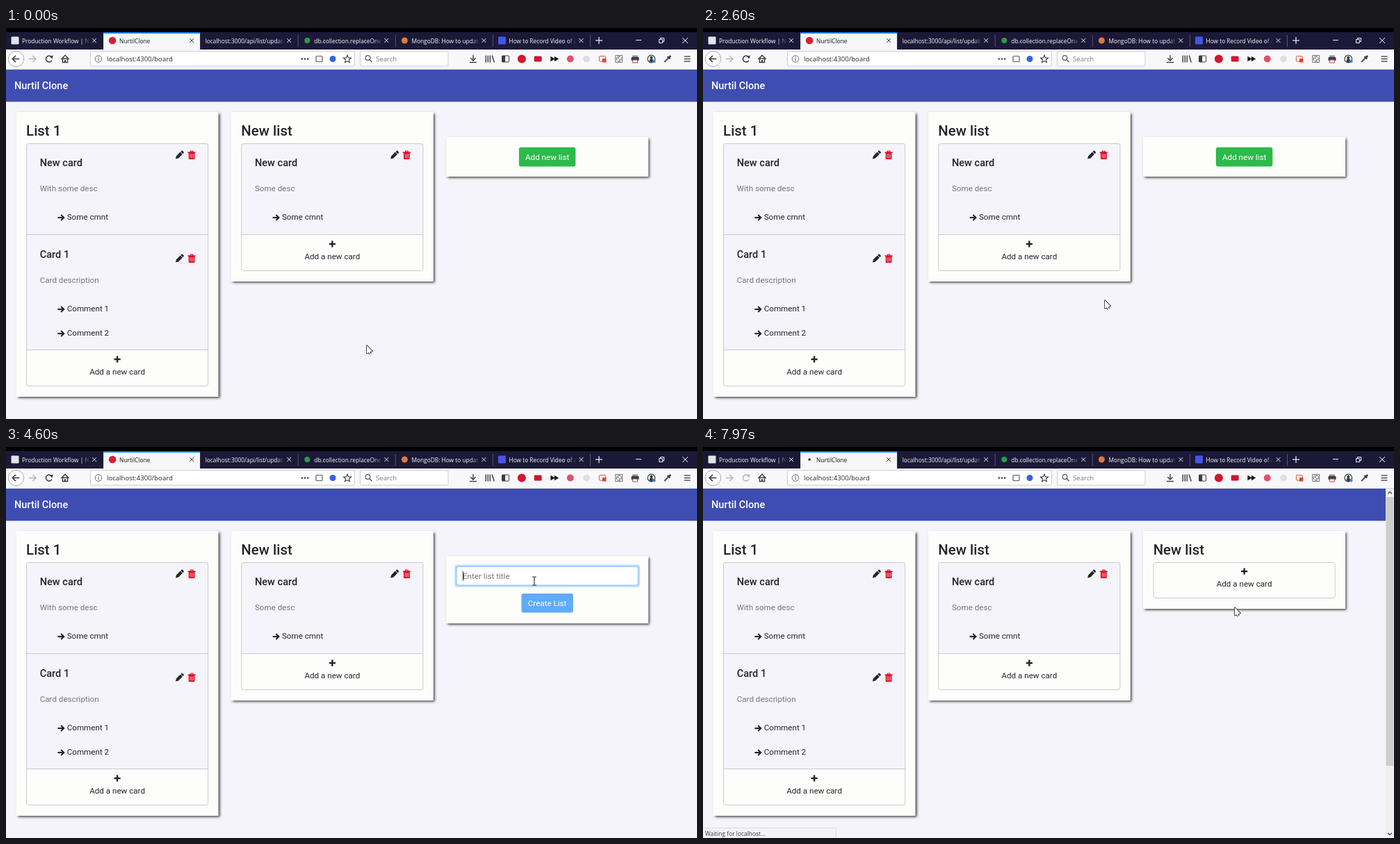
An HTML page with a canvas for the animation above (8 s loop, 994 by 563 pixels).

```html
<!DOCTYPE html>
<html lang="en">
<head>
<meta charset="utf-8">
<title>Board</title>
<style>
html, body { margin: 0; width: 100%; height: 100%; overflow: hidden; background: #000; }
canvas { display: block; width: 994px; height: 563px; }
</style>
</head>
<body>
<canvas id="stage" width="994" height="563"></canvas>
<script>
const ctx = document.getElementById('stage').getContext('2d');
const LOOP = 8000;
const K = 994 / 1366;            // page zoom
const BODY = 16 * K, CARD = 20 * K, HEAD = 28 * K;
const GAP = 20 * K, LIST_W = 400 * K, STEP = 425 * K, INNER = LIST_W - 2 * GAP;
const UI = '"Open Sans", "Noto Sans", sans-serif';
const PAGE = 'Roboto, Arial, sans-serif';
const INK = '#212529', MUTED = '#72777c', CHROME = '#3b3b40', PALE = '#b4b4ba';
const PAPER = '#fdfdfb', BG = '#f5f4fa', RULE = '#cbcad1', RED = '#e00a24';
const RIGHT = 0, DOWN = Math.PI / 2, LEFT = Math.PI, UP = -Math.PI / 2;

const OPEN = 4080, DONE = 7700;
const TITLE = 'New list';
const keyTime = i => 4980 + 157 * i;

const START = { x: 519, y: 457 };
const MOVES = [
  { from: 600, to: 1200, x: 510, y: 467 },
  { from: 2350, to: 3130, x: 789, y: 160 },
  { from: 3130, to: 3600, x: 760, y: 193 },
  { from: 7090, to: 7440, x: 765, y: 231 }
];

const clamp = v => Math.max(0, Math.min(1, v));
const smooth = v => v * v * (3 - 2 * v);

function paint(fill, line, width = 1) {
  if (fill) { ctx.fillStyle = fill; ctx.fill(); }
  if (line) { ctx.strokeStyle = line; ctx.lineWidth = width; ctx.stroke(); }
}

function box(x, y, w, h, fill, r = 0, line, width) {
  ctx.beginPath();
  ctx.roundRect(x, y, w, h, r);
  paint(fill, line, width);
}

function disc(x, y, r, fill, line, width) {
  ctx.beginPath();
  ctx.arc(x, y, r, 0, 7);
  paint(fill, line, width);
}

function line(x1, y1, x2, y2, color, width = 1.4) {
  ctx.beginPath();
  ctx.moveTo(x1, y1);
  ctx.lineTo(x2, y2);
  paint(null, color, width);
}

// Open arrowhead with its tip at x, y
function chevron(x, y, dir, r, color, width = 1.5) {
  const arm = s => [x + r * Math.cos(dir + s), y + r * Math.sin(dir + s)];
  ctx.beginPath();
  ctx.moveTo(...arm(2.36));
  ctx.lineTo(x, y);
  ctx.lineTo(...arm(-2.36));
  paint(null, color, width);
}

function arrow(x, y, dir, r, color, width) {
  const dx = r * Math.cos(dir), dy = r * Math.sin(dir);
  line(x - dx, y - dy, x + dx, y + dy, color, width);
  chevron(x + dx, y + dy, dir, r * 1.3, color, width);
}

function triangle(x, y, dir, r, color) {
  ctx.beginPath();
  for (let i = 0; i < 3; i++) {
    const a = dir + i * Math.PI * 2 / 3;
    ctx.lineTo(x + r * Math.cos(a), y + r * Math.sin(a));
  }
  ctx.closePath();
  paint(color);
}

function cross(x, y, r, color, width) {
  line(x - r, y - r, x + r, y + r, color, width);
  line(x - r, y + r, x + r, y - r, color, width);
}

function plus(x, y, r, color, width) {
  line(x - r, y, x + r, y, color, width);
  line(x, y - r, x, y + r, color, width);
}

function text(s, x, y, size, color, { weight = 400, family = PAGE, align = 'left' } = {}) {
  ctx.font = `${weight} ${size}px ${family}`;
  ctx.textAlign = align;
  ctx.fillStyle = color;
  ctx.fillText(s, x, y);
}

const uiText = (s, x, y, size, color) => text(s, x, y, size, color, { family: UI });

const square = color => (x, y) => box(x - 5.5, y - 5.5, 11, 11, color, 1);
const circle = (color, r = 5.3) => (x, y) => disc(x, y, r, color);

function tab(i, title, icon, active) {
  const x = i * 140.1;
  const ink = active ? '#15151a' : '#f5f5f8';
  if (active) {
    box(x, 6, 139, 25.5, '#f7f7f9');
    box(x, 6, 139, 2, '#0a84ff');
  } else if (i) {
    box(x + 139.5, 10, 1, 17, '#55536a');
  }
  if (icon) icon(x + 13, 18);
  const fade = ctx.createLinearGradient(x + 109, 0, x + 120, 0);
  fade.addColorStop(0, ink);
  fade.addColorStop(1, ink + '00');
  uiText(title, x + (icon ? 23 : 6.5), 21.5, 8.35, fade);
  cross(x + 127, 18, 3, active ? '#333' : '#e6e6ea', 1);
}

function tabs(t, loading) {
  box(0, 0, 994, 31, '#1c1938');
  box(0, 0, 994, 6, '#000');
  const throbber = (x, y) => disc(x + 4 * Math.sin((t - 7970) / 110), y, 1.8, '#333');
  tab(0, 'Production Workflow | Nur', square('#dfe5ec'));
  tab(1, 'NurtilClone', loading ? throbber : circle('#dd1b33'), true);
  tab(2, 'localhost:3000/api/list/update');
  tab(3, 'db.collection.replaceOne()', circle('#2b9b45', 4));
  tab(4, 'MongoDB: How to update', circle('#dd7a3a', 4.5));
  tab(5, 'How to Record Video of a', square('#4656e8'));
  const c = '#f2f2f5';
  plus(853, 18, 5, c, 1.2);
  line(906, 17.5, 914, 17.5, c, 1);
  box(941.5, 14.5, 5, 5, null, 0, c);
  box(939.5, 16.5, 5, 5, '#1c1938', 0, c);
  cross(977, 18, 4, c, 1);
}

function field(x, w) {
  box(x, 33.5, w, 21.5, '#fff', 2, '#cdcdd2');
}

function star(x, y, r, color) {
  ctx.beginPath();
  for (let i = 0; i < 10; i++) {
    const a = i * Math.PI / 5 + UP, d = i % 2 ? r * .45 : r;
    ctx.lineTo(x + d * Math.cos(a), y + d * Math.sin(a));
  }
  ctx.closePath();
  paint(null, color, 1.1);
}

const ICONS = [
  (x, y) => {
    arrow(x, y - 1.5, DOWN, 4, CHROME, 1.4);
    line(x - 5, y + 5, x + 5, y + 5, CHROME);
  },
  (x, y) => {
    for (let i = 0; i < 4; i++) line(x - 5 + i * 3, y - 5, x - 5 + i * 3 + (i > 2 ? 3 : 0), y + 5, CHROME);
  },
  (x, y) => {
    box(x - 5, y - 4.5, 10, 9, null, 1, CHROME);
    box(x - 5, y - 4.5, 4.5, 9, CHROME);
  },
  circle('#d5152b', 6),
  (x, y) => box(x - 5.5, y - 4, 11, 8, '#d5152b', 1.5),
  (x, y) => {
    triangle(x - 3, y, RIGHT, 4.2, '#18181b');
    triangle(x + 2.5, y, RIGHT, 4.2, '#18181b');
  },
  circle('#e2506a', 5),
  circle('#dedee4', 4.8),
  (x, y) => {
    box(x - 5, y - 4, 9, 7.5, null, 1, '#d9533d');
    box(x - .5, y - .5, 5.5, 5.5, '#e0442c');
  },
  (x, y) => {
    box(x - 5, y - 5, 10, 10, null, 0, '#77777d');
    for (let i = 0; i < 16; i++) {
      if (i % 3) box(x - 4 + i % 4 * 2.2, y - 4 + Math.floor(i / 4) * 2.2, 1.4, 1.4, '#44444a');
    }
  },
  (x, y) => {
    box(x - 4, y - 5, 8, 4, '#8c8c93');
    box(x - 5.5, y - 2.5, 11, 5, CHROME, 1);
    box(x - 3.5, y + 1.5, 7, 4, BG, 0, '#c04852');
  },
  (x, y) => {
    disc(x, y, 5.3, null, CHROME, 1.2);
    disc(x, y - 2, 2, CHROME);
    disc(x, y + 2.2, 2.6, CHROME);
    disc(x + 4, y + 3.5, 2.3, '#4b83cf');
  },
  (x, y) => {
    line(x - 4.5, y + 4.5, x + 2, y - 2, '#55555b', 2.2);
    line(x, y - 3.5, x + 3.5, y, CHROME, 2.4);
    line(x + 2, y - 2, x + 4.5, y - 4.5, CHROME, 2.6);
  }
];

function toolbar(loading) {
  const mid = 44.5, grey = loading ? PALE : CHROME;
  box(0, 31, 994, 28.7, '#f8f8fa');
  box(0, 59, 994, .7, '#cccbd2');

  disc(14.5, mid, 11.2, '#fff', '#a9a9b0');
  arrow(14.3, mid, LEFT, 5, CHROME, 1.6);
  arrow(38, mid, RIGHT, 5, PALE, 1.5);
  ctx.beginPath();
  ctx.arc(62, mid, 4.5, .5, 5.6);
  paint(null, grey, 1.5);
  triangle(65.7, 41.6, -.8, 3, grey);
  box(81.5, 44, 7, 5.5, null, 0, CHROME, 1.5);
  box(84, 46, 2, 4, CHROME);
  chevron(85, 39.3, UP, 8, CHROME);

  field(121.5, 380);
  disc(133, mid, 4.8, null, '#66666c');
  line(133, 43.6, 133, 47.2, '#66666c', 1.2);
  disc(133, 42, .7, '#66666c');
  uiText('localhost:4300/board', 145, 48, 9.6, '#28282d');
  for (let i = -1; i < 2; i++) disc(430 + i * 4.2, mid, 1.3, CHROME);
  box(446, 40.5, 9, 8, null, 1, '#5b5b61', 1.2);
  disc(470, mid, 4.5, '#3a62e0');
  star(491, 45, 5.8, CHROME);

  field(509.5, 126.5);
  disc(520.5, 43, 3.3, null, '#55555b', 1.2);
  line(523, 45.5, 526.5, 49, '#55555b');
  uiText('Search', 532, 48, 9.6, '#76767c');

  ICONS.forEach((icon, i) => icon(672 + i * 23.3, mid));
  for (let i = -1; i < 2; i++) line(975.5, mid + i * 3.5, 984.5, mid + i * 3.5, CHROME, 1.3);
}

function panel(x, y, h) {
  ctx.save();
  ctx.shadowColor = 'rgba(0,0,0,.8)';
  ctx.shadowOffsetX = ctx.shadowOffsetY = 3 * K;
  ctx.shadowBlur = 5 * K;
  box(x, y, LIST_W, h, PAPER);
  ctx.restore();
}

function pencil(x, y) {
  ctx.save();
  ctx.translate(x, y);
  ctx.rotate(-Math.PI / 4);
  box(-4.5, -2.2, 8.5, 4.4, INK);
  box(4.8, -2.2, 2.8, 4.4, INK, 1);
  triangle(-5.4, 0, LEFT, 2.5, INK);
  ctx.restore();
}

function trash(x, y) {
  box(x - 1.9, y - 6, 3.8, 2, null, .5, RED, 1.1);
  box(x - 5.5, y - 4.6, 11, 1.6, RED);
  box(x - 4.4, y - 3.2, 8.8, 9.2, RED, 1);
  for (let i = -1; i < 2; i++) box(x + i * 2.2 - .4, y - 1.8, .8, 6, '#f6d5da');
}

function card(x, y, { h, title, desc, iconY, comments }) {
  box(x, y, INNER, h, BG);
  text(title, x + 19.6, y + 33, CARD, INK, { weight: 500 });
  text(desc, x + 19.6, y + 69, BODY, MUTED);
  pencil(x + 220.3, y + iconY);
  trash(x + 238, y + iconY);
  comments.forEach((c, i) => {
    arrow(x + 49.7, y + 107 + i * 35, RIGHT, 4.4, INK, 2.1);
    text(c, x + 58.6, y + 110 + i * 35, BODY, INK);
  });
  box(x, y + h - 1, INNER, 1, RULE);
}

function list(i, title, cards) {
  const x = GAP + STEP * i, left = x + GAP, cx = x + LIST_W / 2;
  const top = 166, end = cards.reduce((y, c) => y + c.h, top);
  panel(x, 121, end + 67 - 121);
  text(title, left, 155, HEAD, INK, { weight: 500 });
  let y = top;
  for (const c of cards) {
    card(left, y, c);
    y += c.h;
  }
  plus(cx, end + 13, 4.6, INK, 2.4);
  text('Add a new card', cx, end + 35, BODY, INK, { align: 'center' });
  box(left + .4, top + .5, INNER - .8, end + 51 - top, null, 3, RULE);
}

function button(cx, y, w, label, color) {
  box(cx - w / 2, y, w, 27.6, color, 3);
  text(label, cx, y + 18, BODY, '#fff', { align: 'center' });
}

function form(t, hover) {
  const x = GAP + STEP * 2, left = x + GAP, glow = 3.2 * K;
  const typed = [...TITLE].filter((_, i) => keyTime(i) <= t).length;
  const s = TITLE.slice(0, typed);
  panel(x, 157, 97);
  const focus = clamp((t - OPEN) / 150);
  box(left - glow, 171.8 - glow, INNER + 2 * glow, 27.6 + 2 * glow, `rgba(0,123,255,${.25 * focus})`, 4);
  box(left + .4, 172.2, INNER - .8, 26.8, '#fff', 3, '#80bdff');
  text(s || 'Enter list title', 657, 190, BODY, s ? '#495057' : MUTED);
  const since = t - (typed ? keyTime(typed - 1) : OPEN);
  if (since % 1060 < 530) {
    ctx.font = `${BODY}px ${PAGE}`;
    box(Math.round(657 + ctx.measureText(s).width), 179, 1, 13.5, '#222');
  }
  button(x + LIST_W / 2, 211, 74.4, 'Create List', !typed ? '#5fabfc' : hover ? '#0069d9' : '#0a7ffa');
}

function pointerAt(t) {
  return MOVES.reduce((p, m) => {
    const e = smooth(clamp((t - m.from) / (m.to - m.from)));
    return { x: p.x + (m.x - p.x) * e, y: p.y + (m.y - p.y) * e };
  }, START);
}

const POINTERS = {
  text(x, y) {
    line(x, y - 5.5, x, y + 5.5, INK, 1.1);
    for (const s of [-6, 6]) line(x - 2.8, y + s, x + 2.8, y + s, INK, 1);
  },
  hand(x, y) {
    const part = (fill, edge) => {
      box(x - 1, y, 2.4, 9, fill, 1, edge, 2);
      box(x - 3.5, y + 5.5, 9.5, 8, fill, 2, edge, 2);
    };
    part(null, INK);
    part('#fff');
  },
  arrow(x, y) {
    const part = (color, edge) => {
      line(x + 3, y + 8, x + 5.2, y + 12.8, color, edge ? 3.6 : 1.8);
      ctx.beginPath();
      ctx.moveTo(x, y);
      ctx.lineTo(x, y + 11.6);
      ctx.lineTo(x + 8, y + 8.3);
      ctx.closePath();
      paint(color, edge && color, edge);
    };
    ctx.lineJoin = 'round';
    part('#1b1b22', 1.6);
    part('#fff');
    ctx.lineJoin = 'miter';
  }
};

function scrollbar() {
  box(982, 59.7, 12, 504, '#f0f0f1');
  box(982.5, 72, 11, 387, '#cdcdcf');
  chevron(988, 64.5, UP, 4, '#505055');
  chevron(988, 558.5, DOWN, 4, '#505055');
}

const firstCard = desc => ({ h: 132, title: 'New card', desc, iconY: 17, comments: ['Some cmnt'] });
const secondCard = { h: 166, title: 'Card 1', desc: 'Card description', iconY: 34, comments: ['Comment 1', 'Comment 2'] };

function draw(t) {
  const loading = t >= DONE, editing = t >= OPEN && !loading;
  const { x, y } = pointerAt(t);
  const over = (left, top, w, h) => x >= left && x <= left + w && y >= top && y <= top + h;
  const hover = editing ? over(741, 211, 75, 28) : !loading && over(738, 172, 81, 27);

  box(0, 0, 994, 563, BG);
  box(0, 59.7, 994, 64 * K, '#3e4db1');
  text('Nurtil Clone', 12, 88, CARD, '#fff', { weight: 500 });
  list(0, 'List 1', [firstCard('With some desc'), secondCard]);
  list(1, 'New list', [firstCard('Some desc')]);

  if (loading) {
    list(2, TITLE, []);
    scrollbar();
    box(-1, 548.5, 192.5, 16, '#f3f3f5', 0, '#dcdce0');
    uiText('Waiting for localhost...', 3, 560, 8.4, CHROME);
  } else if (editing) {
    form(t, hover);
  } else {
    const left = GAP + STEP * 2;
    panel(left, 157, 57);
    button(left + LIST_W / 2, 171.8, 81.4, 'Add new list', hover ? '#218838' : '#2eb94b');
  }

  tabs(t, loading);
  toolbar(loading);
  POINTERS[hover ? 'hand' : editing && over(648, 172, 262, 32) ? 'text' : 'arrow'](x, y);
}

const start = performance.now();
function tick() {
  draw((performance.now() - start) % LOOP);
  requestAnimationFrame(tick);
}
tick();
</script>
</body>
</html>
```
